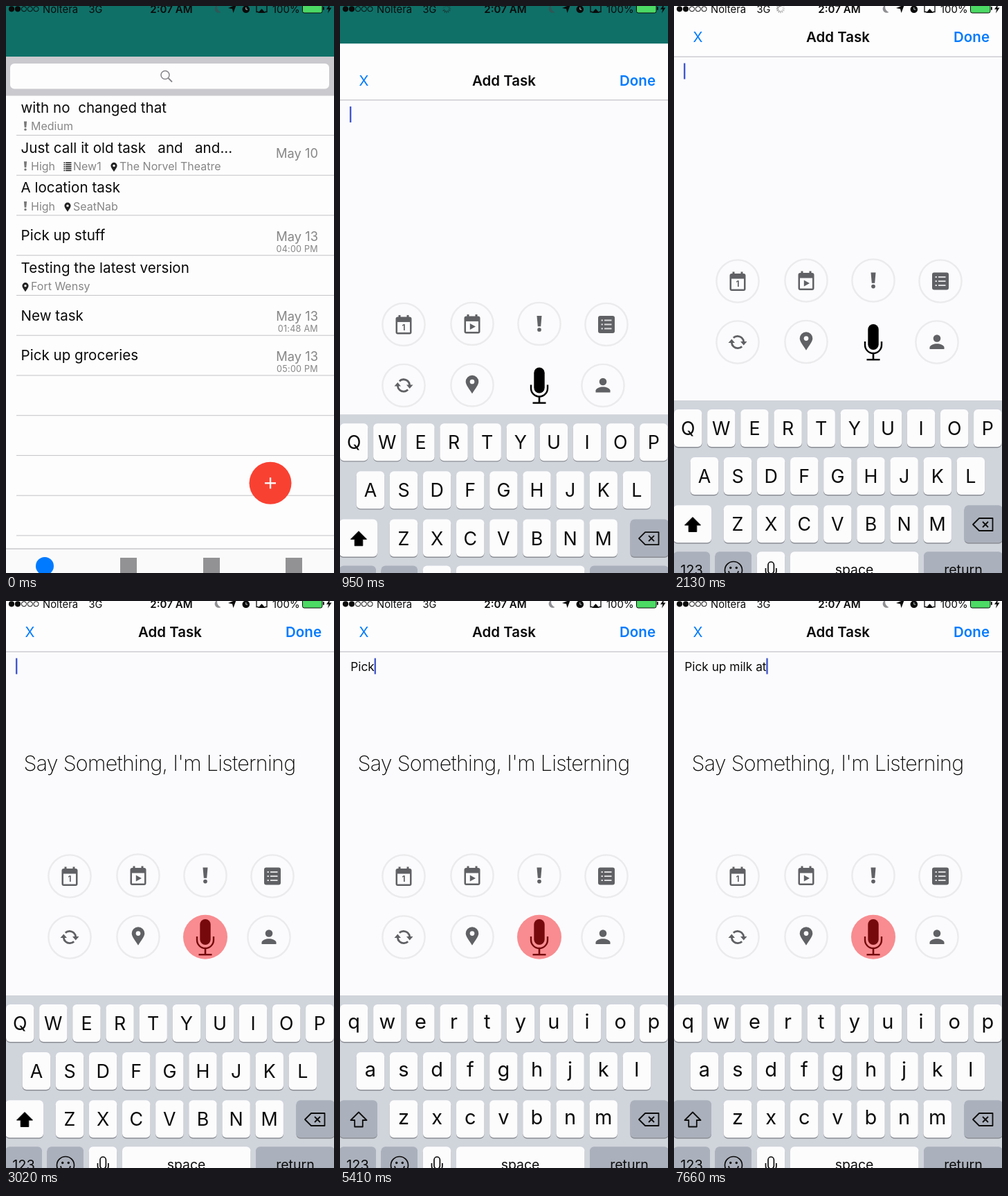
An HTML page with a canvas for the animation above (8 s loop, 474 by 818 pixels).

```html
<!DOCTYPE html>
<html lang="en">
<head>
<meta charset="utf-8">
<title>Add a task by voice</title>
<style>
html, body { margin: 0; width: 100%; height: 100%; overflow: hidden; background: #fcfcfd; }
canvas { display: block; width: 474px; height: 818px; }
</style>
</head>
<body>
<canvas id="stage"></canvas>
<script>
const W = 474, H = 818, LOOP = 8000;
const BLUE = '#007aff', GLYPH = '#606164', LINE = '#c8c8cc', PAPER = '#fbfbfd';
const canvas = document.getElementById('stage');
const ratio = window.devicePixelRatio || 1;
canvas.width = W * ratio;
canvas.height = H * ratio;
const c = canvas.getContext('2d');

// [time, value] tracks with hard steps
const CARET = [[0, 1], [1240, .5], [1390, 0], [1690, .5], [1840, 1], [2280, .5], [2430, 0],
  [2870, .5], [3020, 1], [3320, .5], [3470, 0], [3770, .5], [3920, 1], [4370, .12],
  [4820, .5], [4960, 1], [5260, .5], [5410, 1], [6310, .5], [6460, 0], [6760, .5],
  [6910, 1], [7210, .5], [7360, 0], [7660, 1]];
const TYPED = [[0, ''], [5410, 'Pick'], [5560, 'Pick up'], [5710, 'Pick up milk'], [7660, 'Pick up milk at']];
const LISTEN_AT = 2870, LOWER_AT = 5410, SPIN_FROM = 500, SPIN_TO = 2580;

const TASKS = [
  { title: 'with no  changed that', tags: [['bang', 28, 'Medium']] },
  { title: 'Just call it old task   and   and...', date: 'May 10',
    tags: [['bang', 28, 'High'], ['list', 89, 'New1'], ['pin', 156, 'The Norvel Theatre']] },
  { title: 'A location task', tags: [['bang', 28, 'High'], ['pin', 89, 'SeatNab']] },
  { title: 'Pick up stuff', date: 'May 13', time: '04:00 PM' },
  { title: 'Testing the latest version', tags: [['pin', 28, 'Fort Wensy']] },
  { title: 'New task', date: 'May 13', time: '01:48 AM' },
  { title: 'Pick up groceries', date: 'May 13', time: '05:00 PM' }
];

const at = (track, t) => track.reduce((v, [time, next]) => t >= time ? next : v, track[0][1]);

function text(str, x, y, size, { color = '#0a0a0a', weight = 400, align = 'left', track = 0 } = {}) {
  c.font = `${weight} ${size}px Inter, Roboto, sans-serif`;
  c.letterSpacing = track + 'px';
  c.textAlign = align;
  c.fillStyle = color;
  c.fillText(str, x, y);
}
function rect(x, y, w, h, color) {
  c.fillStyle = color;
  c.fillRect(x, y, w, h);
}
function round(x, y, w, h, r, color) {
  c.beginPath();
  c.roundRect(x, y, w, h, r);
  c.fillStyle = color;
  c.fill();
}
function disc(x, y, r, color) {
  c.beginPath();
  c.arc(x, y, r, 0, 2 * Math.PI);
  c.fillStyle = color;
  c.fill();
}
function ring(x, y, r, width, color, from = 0, to = 2 * Math.PI) {
  c.beginPath();
  c.arc(x, y, r, from, to);
  c.lineWidth = width;
  c.strokeStyle = color;
  c.stroke();
}
function trace(points, close) {
  c.beginPath();
  points.forEach(([x, y]) => c.lineTo(x, y));
  if (close) c.closePath();
}
function poly(points, color) {
  trace(points, true);
  c.fillStyle = color;
  c.fill();
}
function line(points, width, color, close) {
  trace(points, close);
  c.lineWidth = width;
  c.strokeStyle = color;
  c.stroke();
}
function shifted(dx, dy, draw) {
  c.save();
  c.translate(dx, dy);
  draw();
  c.restore();
}

// Glyphs centred on the current origin
function pin(r, color, hole) {
  c.beginPath();
  c.moveTo(0, r * 1.75);
  c.bezierCurveTo(-r * .5, r * .95, -r, r * .4, -r, -r * .1);
  c.arc(0, -r * .1, r, Math.PI, 0);
  c.bezierCurveTo(r, r * .4, r * .5, r * .95, 0, r * 1.75);
  c.fillStyle = color;
  c.fill();
  disc(0, -r * .1, r * .36, hole);
}
function bang(k, color) {
  poly([[-3.7 * k, -12 * k], [3.7 * k, -12 * k], [2.3 * k, 4 * k], [-2.3 * k, 4 * k]], color);
  disc(0, 9 * k, 3 * k, color);
}
function calendar(inner) {
  round(-11.5, -11, 23, 25, 3, GLYPH);
  rect(-7.5, -13.5, 3, 5, GLYPH);
  rect(4.5, -13.5, 3, 5, GLYPH);
  rect(-9, -3.5, 18, 15, PAPER);
  inner();
}
function listBox() {
  round(-12, -12.5, 24, 25, 3, GLYPH);
  for (const y of [-6, 0, 6]) {
    rect(-7.5, y - 1, 2.4, 2, '#dcdcde');
    rect(-3, y - 1, 10.5, 2, '#dcdcde');
  }
}
function refresh() {
  c.scale(-1, 1);
  for (const turn of [0, Math.PI]) {
    c.save();
    c.rotate(turn);
    ring(0, 0, 8.7, 2.8, GLYPH, Math.PI * 1.02, Math.PI * 1.75);
    poly([[-13.5, -1], [-4, -1], [-8.7, 4.5]], GLYPH);
    c.restore();
  }
}
function person() {
  disc(0, -5.5, 5.3, GLYPH);
  c.beginPath();
  c.moveTo(-10.5, 10);
  c.lineTo(-10.5, 7);
  c.bezierCurveTo(-8, .5, 8, .5, 10.5, 7);
  c.lineTo(10.5, 10);
  c.fillStyle = GLYPH;
  c.fill();
}
function bigMic() {
  round(-7.7, -26, 15.4, 37, 7.7, '#000');
  c.beginPath();
  c.moveTo(-12, -1);
  c.lineTo(-12, 4);
  c.arc(0, 4, 12, Math.PI, 0, true);
  c.lineTo(12, -1);
  c.lineWidth = 2.4;
  c.strokeStyle = '#000';
  c.stroke();
  rect(-1.3, 16, 2.6, 9, '#000');
  rect(-9.5, 24, 19, 2.4, '#000');
}

function tag([kind, x, label], y) {
  shifted(x, y - 6, () => {
    if (kind === 'bang') bang(.56, '#777');
    if (kind === 'pin') pin(4.6, '#222', '#fdfdfd');
    if (kind === 'list') {
      for (let i = -5.5; i < 6; i += 2.8) {
        rect(-5.5, i, 1.8, 1.6, '#222');
        rect(-2.8, i, 8.3, 1.6, '#222');
      }
    }
  });
  text(label, x + 8, y, 16, { color: '#868686' });
}

function drawList() {
  const gray = { color: '#868686', align: 'right' };
  rect(0, 0, W, H, '#fdfdfd');
  rect(0, 0, W, 73, '#0f7068');
  rect(0, 73, W, 56.5, '#c9c9ce');
  round(6, 83, 461, 36.5, 6, '#fdfdfd');
  ring(230, 99.5, 6, 1.5, '#85858a');
  line([[234.5, 104], [240, 109.5]], 1.8, '#85858a');

  for (let i = 0; i < 11; i++) {
    const y = 186.4 + 57.75 * i, task = TASKS[i];
    rect(15, y - .5, W - 15, 1.1, LINE);
    if (!task) continue;
    text(task.title, 21.5, y - (task.tags ? 32.5 : 21.5), 20.6);
    (task.tags || []).forEach(t => tag(t, y - 7.3));
    if (task.date) text(task.date, 451, y - (task.time ? 21 : 25.3), 18.3, gray);
    if (task.time) text(task.time, 451, y - 5, 12.6, { ...gray, track: .25 });
  }

  rect(0, 783, W, 35, '#fafafb');
  rect(0, 782.5, W, 1.2, '#bcbcc0');
  disc(56, 808, 13, BLUE);
  for (const x of [165, 285, 404]) rect(x, 796, 24, 24, '#929294');

  disc(382, 688.3, 30.5, '#f94132');
  rect(374, 687.2, 16, 2.3, '#fff');
  rect(380.9, 680.3, 2.3, 16, '#fff');
}

function drawSheet(t) {
  rect(0, -8, W, 900, PAPER);
  rect(0, -8, W, 81, '#fdfdfe');
  rect(0, 72.6, W, 1.2, '#c3c3c8');
  text('X', 27.5, 52.3, 20.4, { color: BLUE });
  text('Add Task', 237, 52.3, 20.5, { weight: 600, align: 'center' });
  text('Done', 456, 52.3, 20.5, { weight: 600, align: 'right', color: BLUE });

  const typed = at(TYPED, t);
  text(typed, 15.2, 101, 17.3);
  const end = typed ? c.measureText(typed).width + 1 : 0;
  c.globalAlpha = at(CARET, t);
  rect(14 + end, 82.5, 2.4, 23, '#4459cc');
  c.globalAlpha = 1;

  if (t >= LISTEN_AT) text("Say Something, I'm Listerning", 25.5, 245, 30.4, { weight: 200, track: -.7 });

  const buttons = [
    [92, 397, () => calendar(() => text('1', 0, 8.3, 11.5, { weight: 700, align: 'center', color: GLYPH }))],
    [191, 396, () => calendar(() => poly([[-3.2, -.5], [5, 4], [-3.2, 8.5]], GLYPH))],
    [288, 396, () => bang(.95, GLYPH)],
    [385, 397, listBox],
    [92, 485, refresh],
    [191, 484.5, () => shifted(0, -4, () => pin(9.3, GLYPH, PAPER))],
    [380, 485, person]
  ];
  for (const [x, y, glyph] of buttons) {
    ring(x, y, 30.6, 2.4, '#ebebed');
    shifted(x, y, glyph);
  }
  shifted(288, 485, bigMic);
  if (t >= LISTEN_AT) disc(288, 484.8, 32, 'rgba(245,20,25,.48)');
}

function key(x, y, w, dark) {
  round(x, y + 1.4, w, 54, 6, '#8b8e94');
  round(x, y, w, 54, 6, dark ? '#abb1bc' : '#fcfcfd');
}

function drawKeyboard(lower) {
  const ink = '#0c0c0c';
  rect(0, 569, W, 300, '#d0d4db');
  [['QWERTYUIOP', 0, 582], ['ASDFGHJKL', 23.7, 651], ['ZXCVBNM', 71.8, 720.3]].forEach(([row, x0, y]) => {
    [...row].forEach((ch, i) => {
      const x = x0 + 48.12 * i;
      key(x, y, 40.4);
      if (lower) text(ch.toLowerCase(), x + 20.2, y + 34.8, 29, { align: 'center', color: ink });
      else text(ch, x + 20.2, y + 37, 26.8, { align: 'center', color: ink });
    });
  });

  c.lineJoin = 'round';
  key(-1, 720.3, 55, lower);
  const arrow = [[27, 737.5], [38.5, 749], [32.8, 749], [32.8, 758.5], [21.2, 758.5], [21.2, 749], [15.5, 749]];
  if (!lower) poly(arrow, '#000');
  line(arrow, lower ? 1.8 : 1, ink, true);

  key(419.5, 720.3, 55.5, true);
  line([[432, 748], [441, 739], [460.5, 739], [460.5, 757], [441, 757]], 1.8, ink, true);
  line([[446, 744], [454, 752]], 1.8, ink);
  line([[454, 744], [446, 752]], 1.8, ink);
  c.lineJoin = 'miter';

  const y = 787.3;
  key(-1, y, 53, true);
  key(59.5, y, 52.5, true);
  key(119.8, y, 40.4);
  key(168, y, 185.5);
  key(361, y, 114, true);
  text('123', 25.5, 820.5, 20, { align: 'center', color: ink });
  text('space', 260.5, 819.8, 19.4, { align: 'center', color: ink });
  text('return', 418, 819.8, 19.6, { align: 'center', color: ink });

  ring(86, 814, 12.5, 1.7, ink);
  disc(81.7, 810.5, 1.7, ink);
  disc(90.3, 810.5, 1.7, ink);
  ring(86, 814.5, 7, 1.7, ink, .1, Math.PI - .1);

  c.beginPath();
  c.roundRect(136, 802, 8.4, 17, 4.2);
  c.lineWidth = 1.7;
  c.strokeStyle = ink;
  c.stroke();
  line([[132.5, 811], [132.5, 815]], 1.7, ink);
  line([[147.9, 811], [147.9, 815]], 1.7, ink);
  ring(140.2, 815, 7.7, 1.7, ink, 0, Math.PI);
}

function drawStatus(t, tick) {
  const ink = '#0a0a0a';
  [8, 17, 26, 34.8, 43.5].forEach((x, i) => i < 2 ? disc(x, 4.3, 4.1, ink) : ring(x, 4.3, 3.6, 1, ink));
  text('Noltera', 53, 9.6, 14.8);
  text('3G', 119.5, 9.6, 14.6);
  text('2:07 AM', 239, 9.6, 15.1, { weight: 600, align: 'center' });
  text('100%', 424.5, 9.6, 14.9, { align: 'right' });

  if (t >= SPIN_FROM && t < SPIN_TO) {
    for (let i = 0; i < 12; i++) {
      const a = (i + tick * 2) * Math.PI / 6, cos = Math.cos(a), sin = Math.sin(a);
      line([[154 + 3 * cos, 4 + 3 * sin], [154 + 6.2 * cos, 4 + 6.2 * sin]], 1.2, `rgba(30,30,30,${.12 + .06 * i})`);
    }
  }

  // moon
  c.beginPath();
  c.arc(307.5, 4, 5.8, -1.9, 1.05, true);
  c.quadraticCurveTo(303.5, 5, 305.6, -1.5);
  c.fillStyle = 'rgba(70,70,75,.6)';
  c.fill();

  poly([[333, -2], [328.5, 10], [327, 4.3], [321, 3]], ink);
  disc(346.8, 4.8, 5.3, ink);
  line([[346.8, 1.8], [346.8, 5], [349.2, 5]], 1, '#b9c4c4');
  line([[365, 8.5], [362, 8.5], [362, -2], [377, -2], [377, 8.5], [374, 8.5]], 1.3, ink);
  poly([[369.5, 4], [375, 10], [364, 10]], ink);

  c.beginPath();
  c.roundRect(428.5, -3.5, 28.5, 13.5, 2.5);
  c.fillStyle = '#4cd964';
  c.fill();
  c.lineWidth = 1;
  c.strokeStyle = ink;
  c.stroke();
  rect(458, 1.2, 1.8, 4.5, ink);
  poly([[468.5, -3], [463, 4.8], [466.3, 4.8], [465, 10.5], [470.5, 2.6], [467.2, 2.6]], ink);
}

// Remaining share of the sheet's travel: a critically damped spring
function remaining(t) {
  const p = Math.max(0, t - 716) * .0187;
  return (1 + p) * Math.exp(-p);
}

function render(t) {
  const tick = Math.max(0, Math.floor((t - 500) / 148));
  const held = t < 500 ? 0 : 500 + 148 * tick;
  const left = remaining(held);
  c.setTransform(ratio, 0, 0, ratio, 0, 0);
  if (left > .05) drawList();
  if (left < 1) {
    shifted(0, 843 * left, () => drawSheet(t));
    shifted(0, 273 * left, () => drawKeyboard(t >= LOWER_AT));
  }
  drawStatus(t, tick);
}

const start = performance.now();
function loop() {
  render((performance.now() - start) % LOOP);
  requestAnimationFrame(loop);
}
loop();
</script>
</body>
</html>
```
